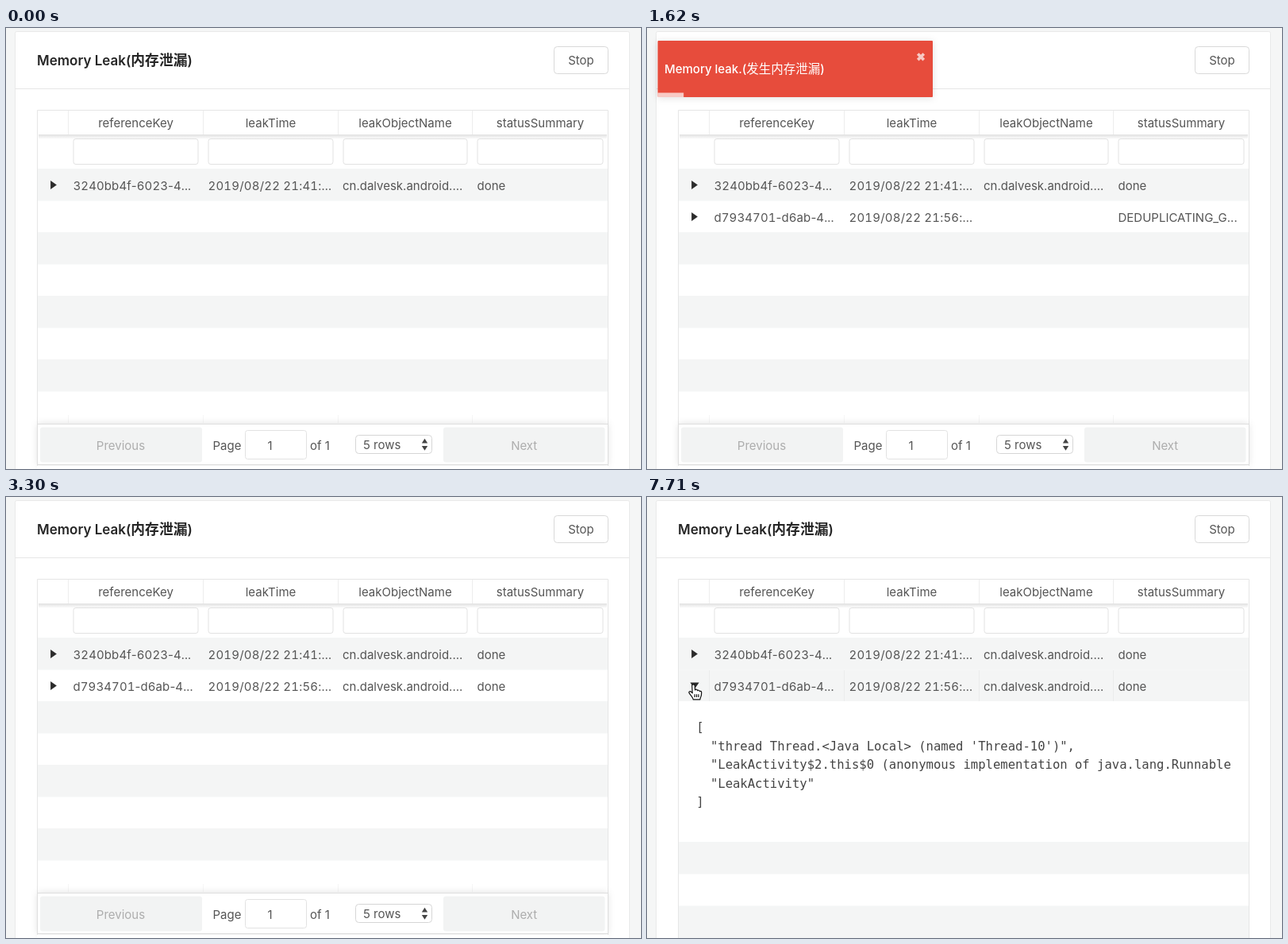
Write an HTML page that moves like this. It is 800 px wide and 555 px high and loops after 8 s.

```html
<!DOCTYPE html>
<html lang="en">
<head>
<meta charset="utf-8">
<title>Memory Leak</title>
<style>
  html, body { margin: 0; width: 100%; height: 100%; overflow: hidden; background: #f5f6f6; }
  svg { display: block; width: 800px; height: 555px; }
  text { font: 15px Inter, "Noto Sans CJK SC", "Noto Sans CJK", sans-serif; fill: #555; }
  .mid { text-anchor: middle; }
  .num { font-variant-numeric: tabular-nums; letter-spacing: .2px; }
  .key { font-variant-numeric: tabular-nums; letter-spacing: .1px; }
  .key tspan { font-variant-numeric: normal; letter-spacing: 0; }
  .title { font-size: 17px; font-weight: 600; fill: #262626; }
  .title tspan { font-size: 17.8px; }
  .msg { font-size: 15px; font-weight: 500; fill: #fff; }
  .msg tspan { font-size: 15.5px; }
  .off { fill: #adadad; }
  .code { font: 15.57px "DejaVu Sans Mono", monospace; fill: #444; }
  .box { fill: #fff; stroke: #e2e2e2; }
  .line { fill: none; stroke: #e6e6e6; }
  .faint { fill: none; stroke: #000; stroke-opacity: .035; }
  .stripe { fill: #f4f5f5; }
  .dark { fill: #2b2b2b; }
  .shade { filter: drop-shadow(0 0 5px rgba(0, 0, 0, .12)); }
  .card { filter: drop-shadow(0 1px 5px rgba(0, 0, 0, .12)); }
</style>
</head>
<body>
<svg id="stage" viewBox="0 0 800 555">
  <defs>
    <linearGradient id="fade" x2="0" y2="1">
      <stop offset="0" stop-opacity=".12"/>
      <stop offset="1" stop-opacity="0"/>
    </linearGradient>
  </defs>
  <rect class="box" x="11.5" y="4.5" width="774" height="570" rx="2" style="stroke:#e9e9e9"/>
  <path class="line" d="M12 76.5H785"/>
  <text class="title" x="39" y="47">Memory Leak(<tspan>内存泄漏</tspan>)</text>
  <rect class="box" x="690.5" y="23.5" width="68" height="34" rx="4" style="stroke:#d9d9d9"/>
  <text class="mid" x="724.5" y="46">Stop</text>

  <g id="head"></g>
  <g id="closed"></g>
  <g id="opened"></g>
  <g id="rows"></g>
  <path class="line" d="M39.5 555V103.5H758.5V555"/>
  <g id="footer">
    <rect class="shade" x="40" y="498" width="718" height="52" fill="#fff"/>
    <path class="line" d="M39.5 498.5H758.5V549.5H39.5Z" style="stroke:#dedede"/>
    <rect x="39" y="551" width="720" height="4" fill="#fff"/>
    <g fill="#f2f3f3">
      <rect x="43" y="502.5" width="204" height="44" rx="3"/>
      <rect x="551" y="502.5" width="203.5" height="44" rx="3"/>
    </g>
    <text class="mid off" x="144.5" y="530.5">Previous</text>
    <text class="mid off" x="652.7" y="530.5">Next</text>
    <text x="260.5" y="530.5">Page</text>
    <rect class="box" x="301.5" y="506.5" width="77" height="36" rx="3"/>
    <text class="mid" x="332.5" y="530.5">1</text>
    <text x="383" y="530.5">of 1</text>
    <rect class="box" x="440.5" y="512.5" width="96" height="23" rx="4" style="stroke:#d6d6d6"/>
    <text x="450" y="529.5">5 rows</text>
    <path d="M523.8 522.5L527.5 516.8 531.2 522.5ZM523.8 526L527.5 531.7 531.2 526Z" fill="#444"/>
  </g>

  <g id="toast">
    <rect class="card" width="346.5" height="71" rx="1" fill="#e74c3c"/>
    <rect id="bar" y="65.5" width="346" height="5.5" fill="#fff" fill-opacity=".7"/>
    <text class="msg" x="8.5" y="41">Memory leak.(<tspan>发生内存泄漏</tspan>)</text>
    <path d="M327.7 16.5L335.3 24.1M335.3 16.5L327.7 24.1" stroke="#fff" stroke-width="3.7" opacity=".7"/>
  </g>

  <g id="cursor">
    <path id="arrow" d="M0 0V16.2L3.8 12.6 6.4 18.6 9 17.5 6.5 11.6H11.8Z" stroke="#fff" stroke-width="1.2"/>
    <path id="hand" d="M-1.8 1.2C-1.8-.9 1.6-.9 1.7 1.2L2 6.6C2.6 5.4 5 5.7 5 7.4 5.6 6.4 7.8 6.8 7.8 8.4 8.4 7.6 10.2 8 10.2 9.8L9.9 13.4C9.6 15 8.4 16 8.4 18.5H-.2C-.6 16-3.2 13.8-5.4 10.4-6.4 8.6-4 7.4-2.4 9.4L-1.3 10.6ZM1.6 12V15.6M4 12V15.6M6.4 12V15.6"
      fill="#fff" stroke="#111" stroke-width="1.2" stroke-linejoin="round"/>
  </g>
</svg>
<script>
const $ = id => document.getElementById(id);
const show = (id, on) => { $(id).style.display = on ? '' : 'none'; };
const text = (x, y, str, cls = '') => `<text class="${cls}" x="${x}" y="${y}">${str}</text>`;
const rect = (x, y, w, h, cls) => `<rect class="${cls}" x="${x}" y="${y}" width="${w}" height="${h}"/>`;
const stripe = y => rect(40, y, 718, 40.5, 'stripe');

// column left edges
const cols = [78.5, 248.5, 418.5, 587.5];
const rules = (y, h) => `<path class="faint" d="${cols.map(x => `M${x} ${y}v${h}`).join('')}"/>`;

const names = ['referenceKey', 'leakTime', 'leakObjectName', 'statusSummary'];
$('head').innerHTML =
  rules(104, 30) + rules(104, 30) +
  '<rect x="41" y="134" width="716" height="6" fill="url(#fade)"/>' +
  names.map((name, i) => {
    const end = cols[i + 1] || 758.5;
    return text((cols[i] + end) / 2, 125, name, 'mid') +
      `<rect class="box" x="${cols[i] + 6.5}" y="139.5" width="${end - cols[i] - 13}" height="32" rx="3"/>`;
  }).join('') + stripe(177);

$('closed').innerHTML = [257, 337, 417].map(stripe).join('') + rules(487, 10);

const code = [
  [62.3, '['],
  [79.9, '"thread Thread.&lt;Java Local> (named \'Thread-10\')",'],
  [79.9, '"LeakActivity$2.this$0 (anonymous implementation of java.lang.Runnable'],
  [79.9, '"LeakActivity"'],
  [62.3, ']']
];
$('opened').innerHTML = [217.5, 434, 514.5].map(stripe).join('') + rules(218, 39) +
  '<rect x="40" y="257" width="718" height="177" fill="#fff"/>' +
  code.map(([x, str], i) => text(x, 295.3 + 23.45 * i, str, 'code')).join('');

const owner = 'cn.dalvesk.android....';
const row = (id, y, key, time) => `<g id="${id}">
  <path class="dark" d="M-5.6-3.9H5.6L0 3.9Z" transform="translate(60 ${y - 6.2}) rotate(-90)"/>` +
  text(84.5, y, key.replace(/-/g, '<tspan>-</tspan>'), 'key') + text(254.5, y, time, 'num') +
  text(424, y, owner) + text(593.5, y, 'done') + '</g>';
$('rows').innerHTML =
  row('first', 203.7, '3240bb4f-6023-4...', '2019/08/22 21:41:...') +
  row('second', 243.7, 'd7934701-d6ab-4...', '2019/08/22 21:56:...');
const expander = $('second').querySelector('path');
const [, , object, status] = $('second').querySelectorAll('text');

const states = [
  [500, 'READING_HEAP_D...'],
  [570, 'PARSING_HEAP_DU...'],
  [1550, 'DEDUPLICATING_G...'],
  [2460, 'FINDING_LEAKING...'],
  [3300, 'done']
];

// cubic-bezier timing function
const bezier = (x1, y1, x2, y2) => {
  const at = (a, b, u) => 3 * a * u * (1 - u) ** 2 + 3 * b * u * u * (1 - u) + u ** 3;
  return x => {
    if (x <= 0 || x >= 1) return x <= 0 ? 0 : 1;
    let lo = 0, hi = 1;
    for (let i = 0; i < 30; i++) {
      const mid = (lo + hi) / 2;
      if (at(x1, x2, mid) < x) lo = mid; else hi = mid;
    }
    return at(y1, y2, lo);
  };
};
const ease = bezier(.25, .1, .25, 1);
const bounce = bezier(.215, .61, .355, 1);
const spring = bezier(.175, .885, .32, 1.275);
const linear = x => x;

const track = (keys, p, timing) => {
  if (p <= keys[0][0]) return keys[0][1];
  for (let i = 1; i < keys.length; i++) {
    const [p0, v0] = keys[i - 1], [p1, v1] = keys[i];
    if (p <= p1) return v0 + (v1 - v0) * timing((p - p0) / (p1 - p0));
  }
  return keys[keys.length - 1][1];
};

const ENTER = 500, LEAVE = 1750, BOUNCE = 750, OPEN = 7080;
const enterX = [[0, -3330], [.6, 28], [.75, -11], [.9, 5.5], [1, 0]];
const leaveX = [[0, 0], [.2, 22], [1, -2220]];
const fadeIn = [[0, 0], [.6, 1]];
const fadeOut = [[0, 1], [.2, 1], [1, 0]];
const pathX = [[5540, -3], [5680, 26], [5820, 66], [5890, 80], [5960, 81], [6030, 72], [6100, 62], [6170, 58.5]];
const pathY = [[5540, 253], [5680, 250], [5820, 242], [5960, 238], [6170, 236.3]];

function drawToast(t) {
  const visible = t >= ENTER && t < 2040;
  show('toast', visible);
  if (!visible) return;
  const leaving = t >= LEAVE;
  const p = (t - (leaving ? LEAVE : ENTER)) / BOUNCE;
  const x = 13.5 + (leaving ? track(leaveX, p, ease) : track(enterX, p, bounce));
  $('toast').setAttribute('transform', `translate(${x} 16)`);
  $('toast').setAttribute('opacity', leaving ? track(fadeOut, p, ease) : track(fadeIn, p, bounce));
  $('bar').setAttribute('width', Math.max(0, 346 * (1738 - t) / 1250));
}

function drawCursor(t) {
  show('cursor', t >= 5540);
  const x = track(pathX, t, linear), y = track(pathY, t, linear);
  const over = x > 40 && x < 78;
  $('cursor').setAttribute('transform', `translate(${x} ${y})`);
  show('arrow', !over);
  show('hand', over);
}

function draw() {
  // the picture advances in 70 ms steps
  const t = Math.floor((performance.now() % 8000 - 10) / 70) * 70 + 10;
  const open = t >= OPEN;
  show('second', t >= 500);
  show('closed', !open);
  show('footer', !open);
  show('opened', open);
  const state = states.filter(s => t >= s[0]).pop();
  status.textContent = state ? state[1] : '';
  object.textContent = t >= 3300 ? owner : '';
  const angle = -90 * (1 - spring((t - OPEN) / 330));
  expander.setAttribute('transform', `translate(60 237.5) rotate(${angle})`);
  drawToast(t);
  drawCursor(t);
  requestAnimationFrame(draw);
}
draw();
</script>
</body>
</html>
```
